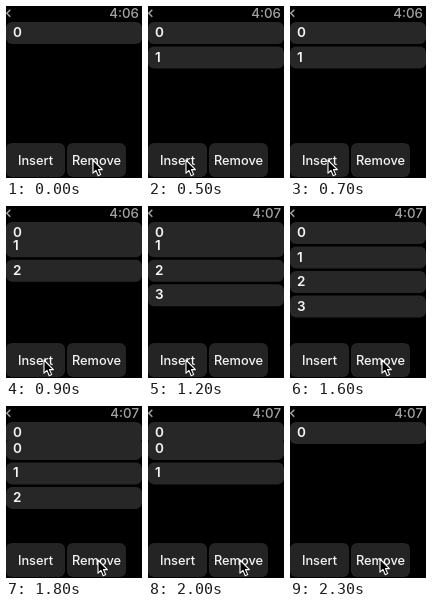
Animation of 136x172 px, one loop 2.4 s. Source, as an HTML page:

```html
<!DOCTYPE html>
<html lang="en">
<head>
<meta charset="utf-8">
<title>List insert and remove</title>
<style>
  html, body { margin: 0; width: 100%; height: 100%; overflow: hidden; background: #000; }
  #stage { position: relative; width: 136px; height: 172px; overflow: hidden; background: #000;
    color: #f4f4f4; font-family: Inter, Roboto, sans-serif; }
  #stage > * { position: absolute; }
  .back { left: 0; top: 2px; }
  .clock { right: 3px; top: 0; font: 500 13.3px/14px Inter, Roboto, sans-serif; color: #a4a4a6; }
  .plate { left: 0; top: 16px; width: 136px; height: 22px; border-radius: 6px; background: #272728; }
  .label { left: 7px; top: 17px; font-weight: 600; font-size: 13.5px; line-height: 18px; z-index: 1; }
  .button { top: 137px; width: 59px; height: 34px; border-radius: 6px; background: #242425;
    font-weight: 500; font-size: 12.8px; line-height: 36px; text-align: center; }
  .insert { left: 0; }
  .remove { left: 61px; }
  .cursor { left: 0; top: 0; z-index: 2; }
</style>
</head>
<body>
<div id="stage">
  <svg class="back" width="6" height="11"><path d="M4.3 1.8 0.8 5.3 4.3 8.8" fill="none" stroke="#a4a4a6" stroke-width="1.5"/></svg>
  <div class="clock">4:06</div>
  <div class="button insert">Insert</div>
  <div class="button remove">Remove</div>
  <svg class="cursor" width="13" height="19"><path d="M1 1V14.2L4 11.4 6.2 16.7 8.7 15.6 6.5 10.6H10.4Z" fill="#000" stroke="#fff" stroke-width="1.1" stroke-linejoin="round"/></svg>
</div>
<script>
const LOOP = 2400, STEP = 100, PITCH = 24.5, MAX_ROWS = 4;
const stage = document.getElementById('stage');
const clock = stage.querySelector('.clock');
const cursor = stage.querySelector('.cursor');

// count: rows once the change has finished
const changes = [
  { at: 225, length: 270, count: 2, insert: true },
  { at: 758, length: 270, count: 3, insert: true },
  { at: 1058, length: 270, count: 4, insert: true },
  { at: 1750, length: 125, count: 3 },
  { at: 1950, length: 125, count: 2 },
  { at: 2150, length: 125, count: 1 }
];

// time, x, y of the pointer tip
const path = [
  [0, 86, 153], [100, 62, 153], [200, 39, 153], [300, 37, 153],
  [1300, 37, 153], [1400, 53, 153], [1500, 80, 153], [1600, 91, 153],
  [2000, 91, 153], [2300, 89, 152], [2400, 86, 153]
];

function add(name) {
  const el = document.createElement('div');
  el.className = name;
  return stage.appendChild(el);
}

const rows = Array.from({ length: MAX_ROWS }, () => ({ plate: add('plate'), label: add('label') }));

const smooth = p => p * p * (3 - 2 * p);

function place(row, slot, text, alpha) {
  row.label.textContent = text;
  for (const el of [row.plate, row.label]) {
    el.style.opacity = alpha;
    el.style.transform = `translateY(${slot * PITCH}px)`;
  }
}

function drawList(t) {
  const change = changes.filter(c => c.at <= t).pop();
  const p = change ? Math.min(1, (t - change.at) / change.length) : 1;
  const moving = p < 1;
  const count = change ? change.count : 1;
  const removing = moving && !change.insert;
  const open = removing ? 1 - smooth(p) : smooth(p);
  const shown = removing ? count + 1 : count;

  rows.forEach((row, i) => {
    if (i >= shown) place(row, 0, '', 0);
    else if (i === 0) place(row, 0, 0, Math.min(1, 2 * open));
    else place(row, i - 1 + open, removing ? i - 1 : i, 1);
  });
}

function drawCursor(t) {
  const i = path.findIndex(k => k[0] > t);
  const [t0, x0, y0] = path[i - 1], [t1, x1, y1] = path[i];
  const p = (t - t0) / (t1 - t0);
  cursor.style.transform = `translate(${x0 + (x1 - x0) * p}px, ${y0 + (y1 - y0) * p}px)`;
}

function draw(t) {
  clock.textContent = t >= 1000 ? '4:07' : '4:06';
  drawList(t);
  drawCursor(t);
}

const start = performance.now();
function tick() {
  const t = (performance.now() - start) % LOOP;
  draw(Math.floor(t / STEP) * STEP);
  requestAnimationFrame(tick);
}
tick();
</script>
</body>
</html>
```
